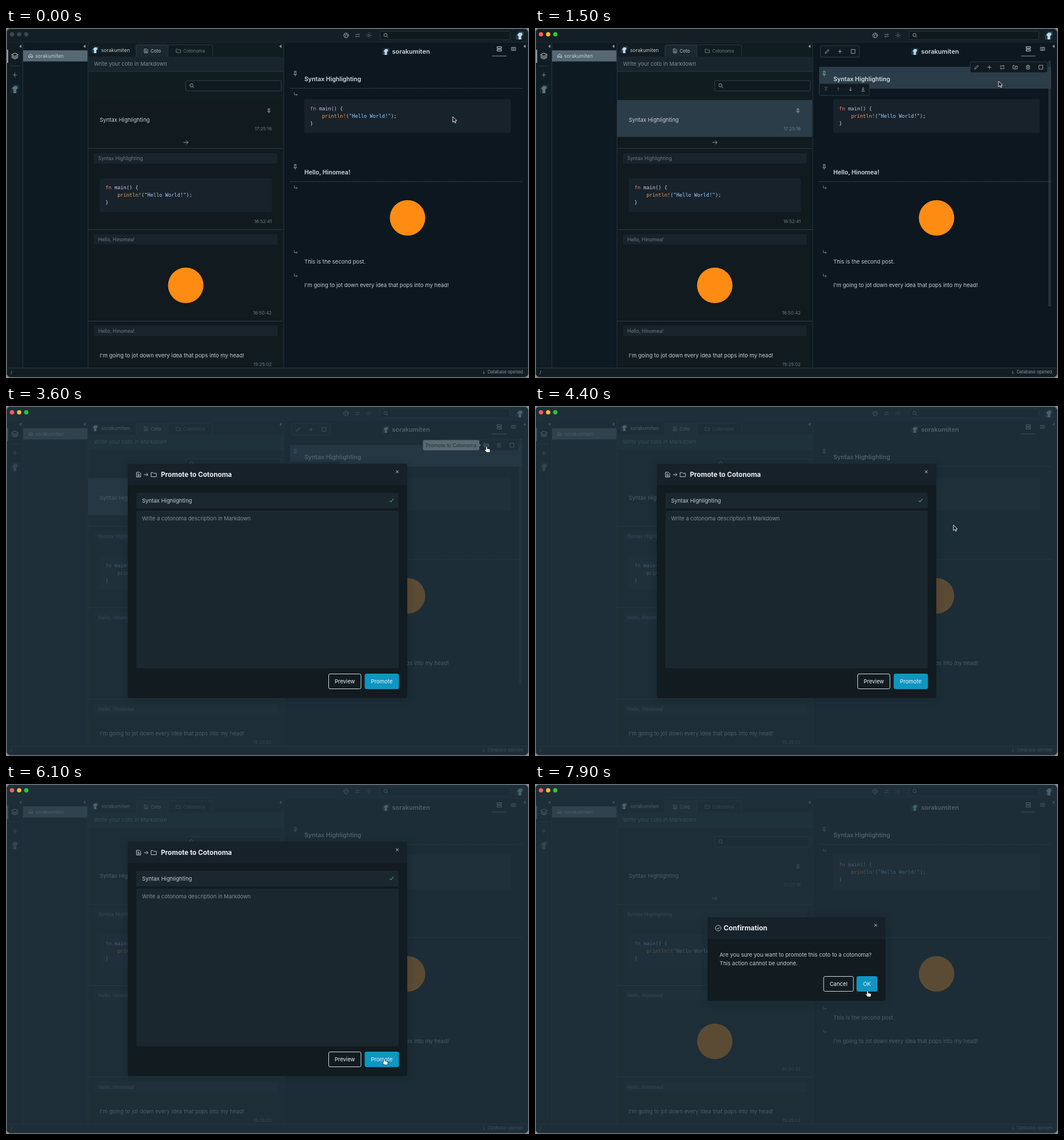
Write an HTML page that moves like this. It is 915x612 px and loops after 8000 ms.

```html
<!DOCTYPE html>
<html lang="en">
<head>
<meta charset="utf-8">
<title>Notes app</title>
<style>
  html, body { margin: 0; width: 100%; height: 100%; overflow: hidden; background: #868c8f; }
  svg { display: block; width: 915px; height: 612px; }
  text { font-family: Inter, "Open Sans", sans-serif; white-space: pre; }
  .code { font: 8.7px "DejaVu Sans Mono", monospace; fill: #c3cdd6; }
  .modal { filter: drop-shadow(0 2px 7px rgba(8, 14, 18, .22)); }
</style>
</head>
<body>
<svg id="stage" viewBox="0 0 915 612"></svg>
<script>
const USER = 'sorakumiten', GREETING = 'Hello, Hinomea!', TOPIC = 'Syntax Highlighting';
const INK = '#c3cdd4', MUTED = '#6d7b85', LINE = '#263640', HOVER = '#2b3d49', BLUE = '#1095c1';

// Icon paths on a 24-unit grid
const ICONS = {
  layers: 'M12 3 2 8l10 5 10-5zM2 12l10 5 10-5M2 16l10 5 10-5',
  home: 'M3 11 12 4l9 7v9h-6v-6H9v6H3z',
  globe: 'M12 2a10 10 0 1 0 .01 0M4 7l6 3-2 5 3 6M14 3l-1 5 7 3-2 6',
  swap: 'M3 8h17l-4-4M21 16H4l4 4',
  sun: 'M16 12a4 4 0 1 1-8 0a4 4 0 1 1 8 0M12 1v3M12 20v3M1 12h3M20 12h3M4 4l2 2M18 18l2 2M4 20l2-2M18 6l2-2',
  search: 'M18 10a7.5 7.5 0 1 1-15 0a7.5 7.5 0 1 1 15 0M16 16l6 6',
  doc: 'M4 3h11l5 5v13H4zM8 9h5M8 13h8M8 17h8',
  folder: 'M2 4h7l3 3h10v13H2z',
  promote: 'M2 4h7l3 3h10v13H2zM12 17v-7M9 13l3-3 3 3',
  plus: 'M12 3v18M3 12h18',
  pin: 'M7 2h10M9 2v9l-3 4h12l-3-4V2M12 15v8',
  sub: 'M5 3v11h14M14 9l5 5-5 5',
  right: 'M2 12h20M14 4l8 8-8 8',
  rows: 'M3 3h18v7H3zM3 14h18v7H3z',
  cols: 'M2 5h20v14H2zM9 5v14M15 5v14',
  edit: 'M3 21l2-6L17 3l4 4L9 19z',
  square: 'M3 3h18v18H3z',
  repeat: 'M3 11V6h17M17 2l4 4-4 4M21 13v5H4M7 14l-4 4 4 4',
  trash: 'M3 6h18M5 6v15h14V6M9 6V3h6v3M10 10v7M14 10v7',
  top: 'M4 3h16M12 22V8M6 14l6-6 6 6',
  up: 'M12 21V4M6 10l6-6 6 6',
  down: 'M12 3v17M6 14l6 6 6-6',
  bottom: 'M4 21h16M12 2v14M6 10l6 6 6-6',
  close: 'M5 5l14 14M19 5 5 19',
  check: 'M3 13l6 6L21 5',
  done: 'M12 2a10 10 0 1 0 .01 0M7 12l4 4 6-7',
  info: 'M9 10h3v10M8 20h8M12 4v2'
};

const rect = (x, y, w, h, fill, r = 0, stroke = 'none') =>
  `<rect x="${x}" y="${y}" width="${w}" height="${h}" rx="${r}" fill="${fill}" stroke="${stroke}"/>`;
const line = (x1, y1, x2, y2, color = LINE, extra = '') =>
  `<path d="M${x1} ${y1}L${x2} ${y2}" stroke="${color}" ${extra}/>`;
const text = (x, y, s, size = 9.54, fill = INK, weight = 400, anchor = 'start') =>
  `<text x="${x}" y="${y}" font-size="${size}" fill="${fill}" font-weight="${weight}" text-anchor="${anchor}">${s}</text>`;
const icon = (name, cx, cy, size = 11, color = '#94a2ab', width = 1) => {
  const k = size / 24;
  return `<path d="${ICONS[name]}" transform="translate(${cx - size / 2} ${cy - size / 2}) scale(${k})"
    fill="none" stroke="${color}" stroke-width="${width / k}" stroke-linejoin="round"/>`;
};
const avatar = (x, y, size, opacity = 1) => `<g transform="translate(${x} ${y}) scale(${size / 12})" opacity="${opacity}">
  <path d="M0 0h12v12H0z" fill="#1c4358"/><path d="M0 0h4v5H0zM9 6h3v6H9z" fill="#0f2430"/>
  <path d="M5 2h4l1 3-2 2v5H4V7L2 5z" fill="#c3d8e2"/></g>`;
const fold = (x, y) => `<path d="M${x + 2} ${y - 3}v6l-4-3z" fill="#87959e"/>`;
const logo = (x, y) => `<circle cx="${x}" cy="${y}" r="31" fill="#ff8c12"/>`;
const span = (fill, s) => `<tspan fill="${fill}">${s}</tspan>`;

function codeBox(x, y, w) {
  const row = (dx, dy, s) => `<text class="code" x="${x + 10 + dx}" y="${y + dy}">${s}</text>`;
  return rect(x, y, w, 59, '#17222b', 2) +
    row(0, 19, span('#f0826a', 'fn') + span('#d6c6ee', ' main') + '() {') +
    row(20.9, 32.3, span('#f69d50', 'println!') + '(' + span('#96d0ff', '"Hello World!"') + ');') +
    row(0, 45.3, '}');
}
const quote = (y, s) => rect(154, y, 321, 18, '#18242c') + text(161.5, y + 12, s, 8.5, MUTED);
const time = (y, s) => text(465, y, s, 8, MUTED, 400, 'end');
const heading = (y, s) => icon('pin', 506, y - 13, 10) + text(522, y, s, 10.5, '#d3dbe0', 600);
const dots = y => line(497, y, 903, y, '#56646d', 'stroke-dasharray="1.3 1.7"');
const sub = y => icon('sub', 507, y, 9, '#74828b');
const bar = (x, y, w, h) => rect(x, y, w, h, '#111a21', 2, '#2c3c46');

function chrome() {
  return rect(1, 1, 913, 610, '#0d1720') + rect(1, 1, 913, 24, '#131f25') +
    rect(1, 25, 28, 569, '#111d24') + rect(30, 25, 113, 569, '#0e1a22') +
    rect(144, 25, 342, 569, '#111c21') + rect(1, 594, 913, 17, '#121d23') +
    line(1, 25, 914, 25, '#1a272e') + line(1, 594.5, 914, 594.5) +
    [29.5, 143.5, 486].map(x => line(x, 25, x, 594, '#24333c')).join('') +
    [25, 137, 480, 907].map(x => fold(x, 32)).join('') +
    icon('globe', 595, 13, 10) + icon('swap', 615, 13, 10, '#74828b') + icon('sun', 635, 13, 11, '#65737c') +
    rect(654.5, 5.5, 227, 15, '#10191f', 2, LINE) + icon('search', 664.5, 13, 9) + avatar(892, 6, 14) +
    text(8, 605, '/', 8, '#8a98a1') + icon('info', 836, 601.5, 7, '#87959e', .9) +
    text(906.5, 604, 'Database opened.', 7.4, '#87959e', 400, 'end');
}

function sidebar() {
  return rect(2, 38, 1.5, 23, '#c3cdd4') + icon('layers', 15.5, 49, 14, '#d3dbe0') +
    line(6, 66.5, 24, 66.5) + icon('plus', 15.5, 82, 10, '#74828b') + avatar(8, 99, 15, .45) +
    rect(30, 39, 112.5, 19.5, '#556874') + icon('home', 43, 48.5, 9, '#c9d4da') + text(51, 52, USER, 8.6, '#c3cfd6');
}

function timeline() {
  return avatar(150, 32, 12) + text(166.5, 42, USER, 8.6) +
    rect(227.5, 29.5, 56, 21, '#1a2830', 2, '#2b3c46') + icon('doc', 245, 40, 9) + text(253, 43, 'Coto', 8) +
    rect(283.5, 29.5, 78, 21, 'none', 2, LINE) + icon('folder', 301.5, 40, 9, MUTED) + text(310, 43, 'Cotonoma', 7.8, MUTED) +
    rect(144, 50, 341, 26, '#18252c') + line(144, 76, 485, 76) +
    text(154, 65.5, 'Write your coto in Markdown', 9.4, '#7f8d96') +
    rect(314.5, 92, 167, 18, '#10191f', 2, '#2f404a') + icon('search', 325, 101, 9) +
    rect(144, 126, 341, 468, '#101a1f') + `<g id="post">${rect(144, 126, 341, 64.5, HOVER)}</g>` +
    icon('pin', 460, 145, 9) + text(164, 164.3, TOPIC) + time(178.5, '17:25:16') + icon('right', 314.5, 200, 10) +
    [210.5, 352.5, 512.5].map(y => line(144, y, 485, y, '#2a3b45')).join('') +
    quote(219, TOPIC) + codeBox(164, 263, 301) + time(340.5, '16:52:41') +
    quote(360.5, GREETING) + logo(314.5, 450) + time(500.5, '16:50:42') +
    quote(520.5, GREETING) + text(164, 576, "I'm going to jot down every idea that pops into my head!") + time(590.5, '15:25:02');
}

function pane() {
  const tools = ['edit', 'plus', 'repeat', 'promote', 'trash', 'square'];
  return avatar(658.5, 35, 12) + text(675.5, 45, USER, 11, '#d3dbe0', 600) +
    icon('rows', 863, 36.5, 10, '#d3dbe0') + icon('cols', 888, 36.5, 9) + line(850.5, 49, 875.5, 49, '#8b99a2') +
    `<g id="paneTools">${bar(499.5, 31, 68, 20)}${icon('edit', 511, 41, 9)}${icon('plus', 533.5, 41, 9)}
      ${icon('square', 556.5, 41, 9)}${rect(898, 57, 4.5, 430, '#25323a', 2)}</g>` +
    dots(105.5) + sub(116) + codeBox(522, 124.5, 361) +
    `<g id="row">${rect(497, 68, 406, 38, HOVER)}${bar(497.5, 97, 87.5, 21)}
      ${icon('top', 509, 107, 9, '#475761')}${icon('up', 530.5, 107, 9, '#475761')}
      ${icon('down', 552, 107, 9)}${icon('bottom', 574, 107, 9)}${bar(761.5, 59, 135, 19)}
      ${tools.map((n, i) => icon(n, 772.5 + 22.5 * i, 68.5, 9)).join('')}</g>` +
    heading(93, TOPIC) + heading(256, GREETING) + dots(268.5) +
    sub(279) + logo(702.5, 332) + sub(392) + text(522, 411.5, 'This is the second post.') +
    sub(433) + text(522, 452.5, "I'm going to jot down every idea that pops into my head!") +
    `<g id="tip">${rect(729.5, 59.5, 98.5, 18, '#fff', 2)}<path d="M828 66l3.5 2.5-3.5 2.5z" fill="#fff"/>
      ${text(778.7, 72, 'Promote to Cotonoma', 8.6, '#18232c', 400, 'middle')}${icon('promote', 840, 68.5, 9, '#e4eaee')}</g>`;
}

const box = (x, y, w, h, head) => rect(x, y, w, h, '#111b20', 3) +
  `<path d="M${x} ${y + head}V${y + 3}q0-3 3-3H${x + w - 3}q3 0 3 3V${y + head}z" fill="#16212a"/>`;
const button = (x, y, w, s, main) => rect(x + .5, y + .5, w - 1, 26, main ? BLUE : 'none', 2.5, main ? BLUE : '#d3dbe0') +
  text(x + w / 2, y + 17, s, 9.5, '#f2f5f7', 400, 'middle');

function promoteDialog() {
  return box(213, 101, 489, 409.5, 37.5) + icon('doc', 232, 120, 11, INK) + icon('right', 245, 120, 8, INK) +
    icon('folder', 258.5, 120, 11, INK) + text(271, 123.8, 'Promote to Cotonoma', 11.7, '#edf0f3', 700) +
    icon('close', 684.5, 115, 8, '#87959e', 1.2) + rect(228, 152, 459, 27, '#1a272f', 2) + rect(228, 183, 459, 275.5, '#1a272f', 2) +
    text(238, 169, TOPIC) + icon('check', 674.5, 165, 9, '#38a050', 1.3) +
    text(238, 199.5, 'Write a cotonoma description in Markdown', 9.4, '#7f8d96') +
    button(564, 468, 57.5, 'Preview') + button(627.5, 468, 60, 'Promote', true);
}

function confirmDialog() {
  return box(302, 233, 311, 146, 38) + icon('done', 320.5, 252, 11.5, INK) +
    text(330, 255.8, 'Confirmation', 11.9, '#edf0f3', 700) + icon('close', 596, 247, 8, '#87959e', 1.2) +
    text(323, 301.5, 'Are you sure you want to promote this coto to a cotonoma?') +
    text(323, 316.5, 'This action cannot be undone.') +
    button(504.5, 336, 53, 'Cancel') + button(562.5, 336, 36.5, 'OK', true);
}

const BEAM = 'M-2.5-5.5Q0-5.5 0-4V4Q0 5.5-2.5 5.5M2.5-5.5Q0-5.5 0-4M0 4Q0 5.5 2.5 5.5M-1.5 1.5h3';
const pointers = `<g id="arrow"><path d="M0 0V9.8L2.3 7.7 3.9 11 5.5 10.3 4 7.1H7z" fill="#101010" stroke="#fff" stroke-width=".9"/></g>
  <g id="hand"><path d="M-1.4 .8a1.1 1.1 0 0 1 2.2 0V3.6l3.8.7q1.6.4 1.5 2L5.4 10H0L-3.3 6.4q-.2-1.6 1.2-1l.7.5z" fill="#fff" stroke="#101010" stroke-width=".6"/></g>
  <g id="beam" fill="none"><path d="${BEAM}" stroke="#101010" stroke-width="2.6"/><path d="${BEAM}" stroke="#fff" stroke-width="1.1"/></g>`;

document.getElementById('stage').innerHTML =
  `<clipPath id="win"><rect x="1" y="1" width="912.5" height="609.5" rx="7"/></clipPath>
  <g clip-path="url(#win)">${chrome()}${sidebar()}${timeline()}${pane()}
    <g id="shade">${rect(0, 0, 915, 612, 'rgba(35,53,64,.74)')}</g></g>
  ${rect(1.5, 1.5, 912, 609, 'none', 7, '#3b464c')}
  ${[10.5, 23, 35.5].map(x => `<circle class="light" cx="${x}" cy="11" r="3.8"/>`).join('')}
  <g id="ask" class="modal">${promoteDialog()}</g><g id="confirm" class="modal">${confirmDialog()}</g>${pointers}`;

const el = id => document.getElementById(id);
const show = (id, on) => { el(id).style.display = on ? '' : 'none'; };
const lights = [...document.querySelectorAll('.light')];

const LOOP = 8000, FOCUS = 800, PANE = 1000, OPEN = 3600, CONFIRM = 6700;
// time, x, y of the pointer's hot spot
const PATH = [
  [0, 781.7, 155], [800, 790, 144], [1500, 811, 93], [1800, 819, 82], [2600, 841, 71], [3600, 841, 71],
  [4400, 732, 208], [5300, 680, 441], [5800, 662, 481], [7000, 662, 481], [7600, 604, 339], [7900, 582, 362], [LOOP, 582, 362]
];

function pointerAt(t) {
  const i = PATH.findIndex(p => p[0] > t);
  const [t0, x0, y0] = PATH[i - 1], [t1, x1, y1] = PATH[i];
  const k = (t - t0) / (t1 - t0);
  return [x0 + (x1 - x0) * k, y0 + (y1 - y0) * k];
}
const within = (x, y, l, t, r, b) => x >= l && x <= r && y >= t && y <= b;

function pointerKind(t, x, y) {
  if (t <= OPEN) return within(x, y, 834, 61, 847, 76) ? 'hand' : 'arrow';
  if (t <= 7000) {
    if (within(x, y, 228, 152, 687, 458)) return 'beam';
    return within(x, y, 628, 468, 687, 494) ? 'hand' : 'arrow';
  }
  return within(x, y, 563, 336, 599, 363) ? 'hand' : 'arrow';
}

function draw(now) {
  const t = Math.floor(now % LOOP / 100) * 100;
  const [x, y] = pointerAt(t), kind = pointerKind(t, x, y);
  const hover = t >= PANE && t <= OPEN, onRow = hover && y < 106;
  show('paneTools', hover);
  show('row', onRow);
  show('post', onRow);
  show('tip', hover && kind === 'hand');
  show('shade', t >= OPEN);
  show('ask', t >= OPEN && t < CONFIRM);
  show('confirm', t >= CONFIRM);
  lights.forEach((l, i) => l.setAttribute('fill', t < FOCUS ? '#3b474d' : ['#ff5f57', '#febc2e', '#28c840'][i]));
  for (const id of ['arrow', 'hand', 'beam']) {
    show(id, id === kind);
    el(id).setAttribute('transform', `translate(${x} ${y})`);
  }
}

const start = performance.now();
function tick() {
  draw(performance.now() - start);
  requestAnimationFrame(tick);
}
tick();
</script>
</body>
</html>
```
